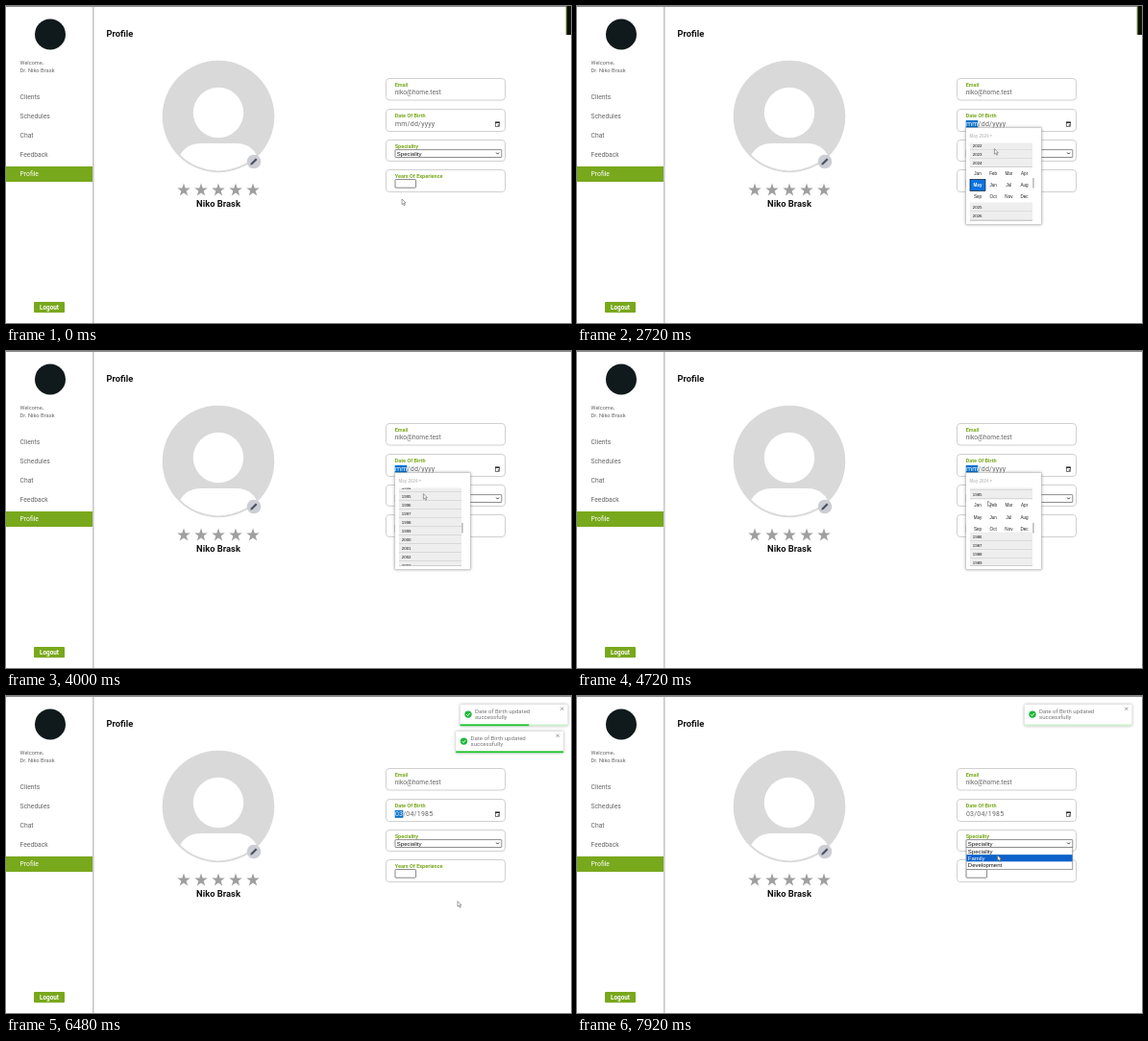
Write an HTML page that moves like this. It is 588x330 px and loops after 8 s.

```html
<!DOCTYPE html>
<html lang="en">
<head>
<meta charset="utf-8">
<title>Profile</title>
<style>
html, body { margin: 0; width: 100%; height: 100%; overflow: hidden; background: #fff; }
svg { display: block; width: 100vw; height: 100vh; font-family: Roboto, sans-serif; }
.arial { font-family: "Liberation Sans", Arial, sans-serif; }
.soft { filter: drop-shadow(0 .5px 1.6px rgba(0, 0, 0, .35)); }
</style>
</head>
<body>
<svg id="stage" viewBox="0 0 588 330"><g id="page"></g><g id="live"></g></svg>
<script>
const LOOP = 8000, STEP = 80;
const GREEN = '#78a81c', GREY = '#666', BLUE = '#0b72e0';
const MONTHS = 'Jan Feb Mar Apr May Jun Jul Aug Sep Oct Nov Dec'.split(' ');

// y is the middle of the capital letters
const text = (x, y, s, size, fill, more = '') =>
  `<text x="${x}" y="${y + size * .355}" font-size="${size}" fill="${fill}" ${more}>${s}</text>`;
const rect = (x, y, w, h, fill, more = '') =>
  `<rect x="${x}" y="${y}" width="${w}" height="${h}" fill="${fill}" ${more}/>`;
const circle = (x, y, r, fill) => `<circle cx="${x}" cy="${y}" r="${r}" fill="${fill}"/>`;
const path = (d, fill, more = '') => `<path d="${d}" fill="${fill}" ${more}/>`;
const BOLD = 'font-weight="700"', MID = 'text-anchor="middle"', ARIAL = 'class="arial"';

const clamp = p => Math.max(0, Math.min(1, p));
const easeOut = p => 1 - (1 - clamp(p)) ** 3;
const easeBoth = p => p * p * (3 - 2 * p);

// keys: [time, value, value...]
function track(t, keys, ease) {
  const i = keys.findIndex(k => k[0] > t);
  if (i === 0) return keys[0].slice(1);
  if (i < 0) return keys[keys.length - 1].slice(1);
  const a = keys[i - 1], b = keys[i], p = ease((t - a[0]) / (b[0] - a[0]));
  return a.slice(1).map((v, k) => v + (b[k + 1] - v) * p);
}

function star(cx, cy, r) {
  let d = '';
  for (let i = 0; i < 10; i++) {
    const a = i * Math.PI / 5, q = i % 2 ? r * .4 : r;
    d += (i ? 'L' : 'M') + (cx + q * Math.sin(a)).toFixed(2) + ' ' + (cy - q * Math.cos(a)).toFixed(2);
  }
  return path(d + 'Z', '#9f9f9f');
}

function page() {
  let s = rect(0, 0, 588, 330, '#fff') + rect(90, 0, 1, 330, '#c8c8c8') +
    rect(91, 0, 1, 330, '#dedede') + rect(0, 0, 588, 1, '#8a8a8a');
  s += circle(46, 29.5, 16, '#10191b');
  s += text(14.5, 59.5, 'Welcome,', 5.6, GREY) + text(14.5, 67, 'Dr. Niko Brask', 5.8, GREY);
  s += rect(0, 167, 90, 16, GREEN);
  ['Clients', 'Schedules', 'Chat', 'Feedback', 'Profile'].forEach((name, i) => {
    s += text(14.5, 94.5 + 20.1 * i, name, 6.8, i === 4 ? '#fff' : GREY);
  });
  s += rect(29, 308, 32, 11.3, GREEN, 'rx="1"') + text(45, 313.6, 'Logout', 6.4, '#fff', BOLD + MID);
  s += text(104.5, 28.5, 'Profile', 9.4, '#111', BOLD);

  s += circle(221, 115, 58.3, '#d9d9d9') + circle(221, 111, 26.2, '#fff');
  s += path('M181.3 155Q188 143 203 143H239Q254 143 260.7 155A56.3 56.3 0 0 1 181.3 155Z', '#fff');
  s += circle(258, 162, 7.3, '#cdced4');
  s += path('M254.3 165.8l.6-2.3 5-5 1.6 1.6-5 5z', '#4c5464');
  for (let i = 0; i < 5; i++) s += star(185 + 18 * i, 191.7, 7.1);
  s += text(221, 205.4, 'Niko Brask', 9.4, '#111', BOLD + MID);

  [['Email', 75.5, 22.5], ['Date Of Birth', 107.5, 23], ['Speciality', 139.5, 22], ['Years Of Experience', 170.5, 23]]
    .forEach(([label, y, h]) => {
      s += rect(395.5, y, 124, h, '#fff', 'rx="3.5" stroke="#c4c4c4" stroke-width=".8"');
      s += text(404.7, y + 6.5, label, 5.5, GREEN, BOLD);
    });
  s += text(404.7, 89.8, 'niko@home.test', 6.6, GREY);
  s += rect(509.4, 121, 4.2, 4.3, 'none', 'stroke="#222" stroke-width=".6"') + rect(509.2, 120.6, 4.6, 1.3, '#222') +
    rect(511.7, 123.4, 1.2, 1.2, '#222');
  s += rect(405, 149.6, 110.8, 7.9, '#fff', 'stroke="#5c5c5c" stroke-width=".7" rx=".5"');
  s += text(406.8, 153.6, 'Speciality', 6, '#111', ARIAL);
  s += path('M510.2 152.6l1.4 1.5 1.4-1.5', 'none', 'stroke="#222" stroke-width=".9"');
  s += rect(405, 180.6, 21.6, 8.6, '#fff', 'stroke="#666" stroke-width=".8" rx=".8"');
  return s;
}

function dateField(t) {
  const parts = t < 5360 ? ['mm', 'dd', 'yyyy'] : ['03', t < 6000 ? '20' : '04', '1985'];
  const focus = t >= 960 && t < 7280, w = t < 5360 ? 12.6 : 8.6;
  const body = `<tspan fill="${focus ? '#fff' : GREY}">${parts[0]}</tspan>/${parts[1]}/${parts[2]}`;
  return (focus ? rect(404.7, 119, w, 7.8, '#0070cc') : '') +
    text(404.9, 122.9, body, 7, GREY, 'letter-spacing=".22"');
}

const popup = inner => `<g class="arial">${rect(404.8, 126.8, 78.4, 100.6, '#fff',
  'class="soft" stroke="#bbb" stroke-width=".5"')}${inner}</g>`;

const heading = (s, fill, x) => text(408.6, 135, s, 4.5, fill, BOLD) +
  path(`M${x} 134.2h3l-1.5 1.8z`, fill);

function dayView(year, month, marked) {
  let s = heading(month === 4 ? 'May 2024' : 'March 1985', '#222', month === 4 ? 429.2 : 434.5);
  const arrow = 'stroke="#444" stroke-width=".7"';
  s += path('M462.8 138v-5.4M460.2 135.1l2.6-2.6 2.6 2.6', 'none', arrow);
  s += path('M474.3 132.4v5.4M471.7 135.3l2.6 2.6 2.6-2.6', 'none', arrow);
  'Su Mo Tu We Th Fr Sa'.split(' ').forEach((d, i) => {
    s += text(414 + 10.05 * i, 148.3, d, 4.4, '#222', MID);
  });
  const lead = new Date(year, month, 1).getDay();
  for (let i = 0; i < 42; i++) {
    const d = new Date(year, month, 1 - lead + i), x = 414 + 10.05 * (i % 7), y = 158.5 + 10.1 * (i / 7 | 0);
    const own = d.getMonth() === month, on = own && d.getDate() === marked;
    if (on) s += rect(x - 4.8, y - 4.9, 9.6, 9.8, BLUE, 'stroke="#123" stroke-width=".7"');
    s += text(x, y, d.getDate(), 4.4, on ? '#fff' : own ? '#111' : '#777', MID + (on ? ' ' + BOLD : ''));
  }
  return popup(s + text(413, 220, 'Clear', 4.5, '#1a73e8') + text(464, 220, 'Today', 4.5, '#1a73e8'));
}

function yearView(t) {
  const [top] = track(t, [[2480, 2024], [2720, 2022], [3280, 2012.9], [3600, 2006.5], [4320, 1984.5]], p => p);
  const open = t < 4600 ? 2024 : 1985;
  const gap = open === 2024 ? 37 : 37 * easeOut((t - 4600) / 200);
  const rowY = y => 145 + 9 * (y - top) + (y > open ? gap : 0);
  let s = '';
  for (let y = Math.floor(top) - 1; y < top + 11; y++) {
    const cy = rowY(y);
    s += rect(409, cy - 4.5, 65, 9, '#eee') + rect(409, cy + 4.1, 65, .6, '#b8b8b8') + text(411.8, cy, y, 4.4, '#111');
  }
  const base = rowY(open);
  if (gap) {
    let grid = '';
    MONTHS.forEach((m, i) => {
      const x = 417 + 16.2 * (i % 4), y = base + 11.3 + 12.2 * (i / 4 | 0), on = open === 2024 && i === 4;
      if (on) grid += rect(x - 8, y - 6, 16, 12, BLUE, 'stroke="#123" stroke-width=".7"');
      grid += text(x, y, m, 4.6, on ? '#fff' : '#222', MID + (on ? ' ' + BOLD : ''));
    });
    s += `<clipPath id="months">${rect(408, base + 4.5, 67, gap, '#000')}</clipPath><g clip-path="url(#months)">${grid}</g>`;
  }
  return popup(heading('May 2024', '#c6c6c6', 429.2) +
    `<clipPath id="list">${rect(408, 142.4, 67, 81.4, '#000')}</clipPath><g clip-path="url(#list)">${s}</g>` +
    rect(409, 223.4, 65, .6, '#b8b8b8') + rect(474, 179, 1.8, 10.6, '#c4c4c4'));
}

function dropdown(t) {
  const on = t < 7600 ? 0 : 1;
  let s = rect(405, 157.6, 110.8, 23, '#fff', 'stroke="#777" stroke-width=".7"');
  ['Speciality', 'Family', 'Development'].forEach((name, i) => {
    const y = 161.4 + 7.35 * i;
    if (i === on) s += rect(405.3, y - 3.6, 110.2, 7.2, '#0d62cb');
    s += text(406.8, y, name, 6, i === on ? '#fff' : '#111', ARIAL);
  });
  return s;
}

// Slides in with a bounce, runs its bar down, then leaves to the right
const IN = 700, LIFE = 1055, PX = .35;
function toast(t, born, y) {
  const age = t - born, out = age - IN - LIFE;
  if (age < 0 || out > IN) return '';
  const [dx] = out > 0
    ? track(out / IN, [[0, 0], [.2, -20], [1, 2000]], easeOut)
    : track(age / IN, [[0, 3000], [.6, -25], [.75, 10], [.9, -5], [1, 0]], easeOut);
  const left = 1 - clamp((age - IN) / LIFE);
  return `<g transform="translate(${472.6 + dx * PX} ${y})">` +
    rect(0, 0, 112, 22.4, '#fff', 'class="soft" rx="1.4"') +
    circle(8.4, 10.3, 3.7, '#1fb738') + path('M6.6 10.4l1.3 1.4 2.4-2.8', 'none', 'stroke="#fff" stroke-width=".9"') +
    text(15.4, 7.2, 'Date of Birth updated', 6.05, '#757575') + text(15.4, 13.3, 'successfully', 6.05, '#757575') +
    path('M104.5 2.9l3.2 3.2M107.7 2.9l-3.2 3.2', 'none', 'stroke="#888" stroke-width=".8"') +
    rect(0, 20.6, 112, 1.8, '#cdf2ce') + rect(0, 20.6, 112 * left, 1.8, '#1fc32f') + '</g>';
}

function cursor(t) {
  const [x, y] = track(t, [
    [240, 412, 201], [880, 511, 121], [1200, 511, 121], [1760, 425, 133], [2120, 423, 133],
    [2440, 434.4, 148.6], [4280, 434.4, 148.6], [4520, 427, 149.5], [4720, 427.6, 156],
    [5240, 449, 159], [5440, 449, 159], [5880, 423, 167], [6080, 423, 167], [6480, 470, 213.6],
    [6640, 470, 213.6], [7120, 440, 152], [7360, 440, 152], [7680, 437.6, 165.8]], easeBoth);
  return path(`M${x} ${y}v5.6l1.3-1.1 1 2.2 1-.5-1-2.1h1.7z`, '#fff', 'stroke="#444" stroke-width=".5"');
}

function live(t) {
  let s = dateField(t);
  if (t < 3040) s += rect(583, 0, 5, 30, '#0c0f0a') + rect(582.6, 0, 1, 30, '#7c9a3c');
  if (t >= 960 && t < 2080) s += dayView(2024, 4, 20);
  else if (t >= 2080 && t < 5360) s += yearView(t);
  else if (t >= 5360 && t < 6000) s += dayView(1985, 2, 20);
  if (t >= 7280) s += dropdown(t);
  s += toast(t, 5400, 8.8) + toast(t, 6046, 36.8 - 28 * easeOut((t - 7855) / 60));
  return s + cursor(t);
}

document.getElementById('page').innerHTML = page();
const layer = document.getElementById('live');
let shown = -1;
function draw() {
  const t = Math.floor(performance.now() % LOOP / STEP) * STEP;
  if (t !== shown) layer.innerHTML = live(shown = t);
  requestAnimationFrame(draw);
}
draw();
</script>
</body>
</html>
```
